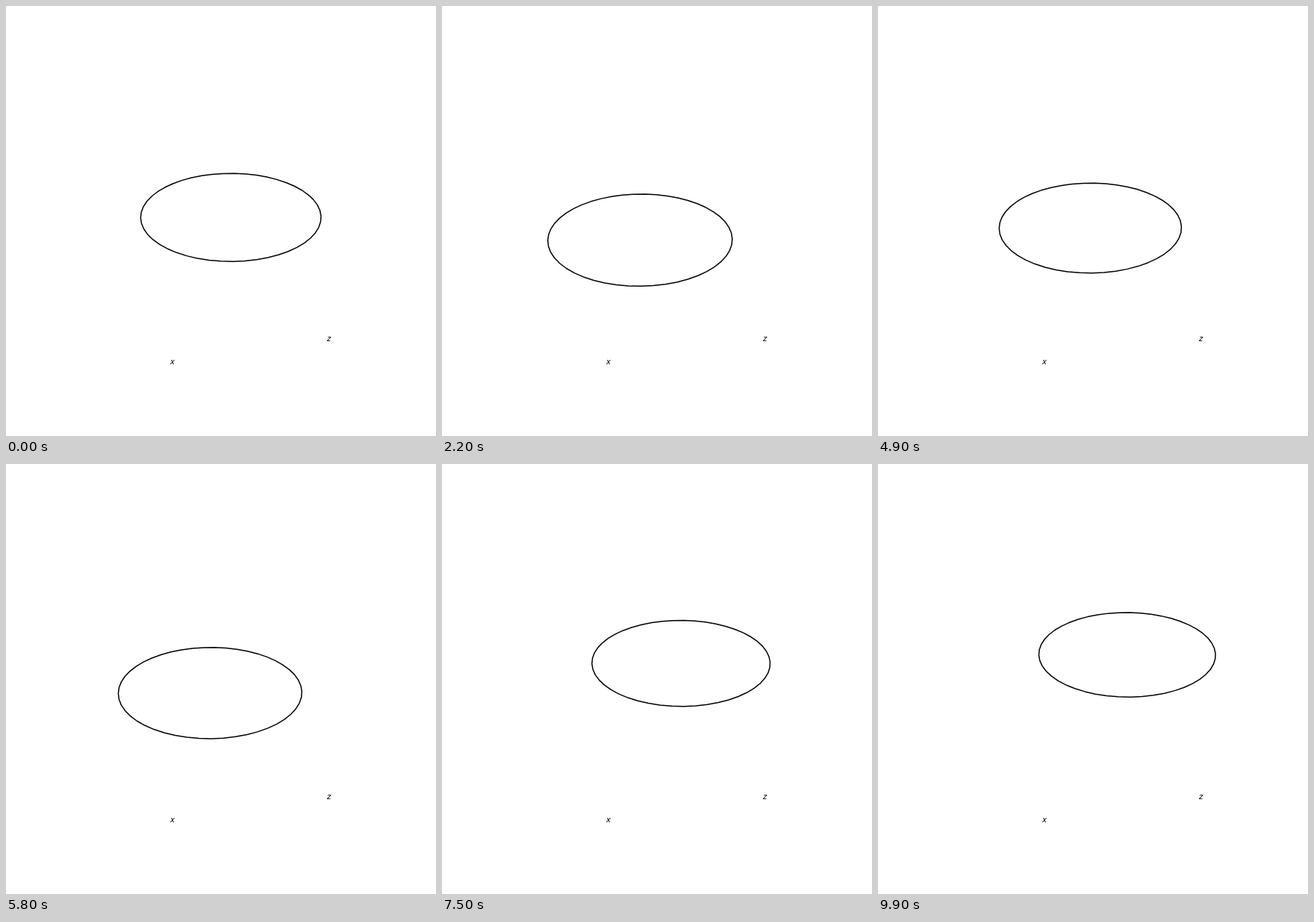
An HTML page for the animation above (10 s loop, 576 px wide and 576 px high).

```html
<!DOCTYPE html>
<html lang="en">
<head>
<meta charset="utf-8">
<title>Oscillating ring</title>
<style>
  html, body { margin: 0; width: 100%; height: 100%; overflow: hidden; background: #fff; }
  svg { display: block; width: 100vw; height: 100vh; }
  text { font: italic 10px "DejaVu Sans", sans-serif; }
  path { fill: none; stroke: #000; stroke-width: 1.5; stroke-linecap: square; stroke-linejoin: round; }
</style>
</head>
<body>
<svg viewBox="0 0 576 576">
  <path id="ring"/>
  <text x="220" y="480">x</text>
  <text x="430" y="449">z</text>
</svg>
<script>
  const STEPS = 100, STEP_MS = 100, DURATION = 10;
  const POINTS = 50, RADIUS = 0.503, AMPLITUDE = 0.303;
  const CENTER = { x: 301.2, y: 280.6 }, FOCAL = 2400, DISTANCE = 10;
  const rad = deg => deg * Math.PI / 180;
  const ELEVATION = rad(29.2), AZIMUTH = rad(-60);
  const ring = document.getElementById("ring");

  // Perspective view of a point on the horizontal plane.
  function project(x, y) {
    const right = -x * Math.sin(AZIMUTH) + y * Math.cos(AZIMUTH);
    const near = x * Math.cos(AZIMUTH) + y * Math.sin(AZIMUTH);
    const scale = FOCAL / (DISTANCE - near * Math.cos(ELEVATION));
    return [CENTER.x + right * scale, CENTER.y + near * Math.sin(ELEVATION) * scale];
  }

  function draw(ms) {
    const step = Math.floor(ms / STEP_MS) % STEPS;
    const shift = AMPLITUDE * Math.sin(2 * DURATION * step / (STEPS - 1));
    const points = Array.from({ length: POINTS }, (_, i) => {
      const angle = 2 * Math.PI * i / (POINTS - 1);
      return project(RADIUS * Math.cos(angle), RADIUS * Math.sin(angle) + shift)
        .map(v => v.toFixed(2)).join(" ");
    });
    ring.setAttribute("d", "M" + points.join("L"));
  }

  const start = performance.now();
  function tick() {
    draw(performance.now() - start);
    requestAnimationFrame(tick);
  }
  tick();
</script>
</body>
</html>
```
